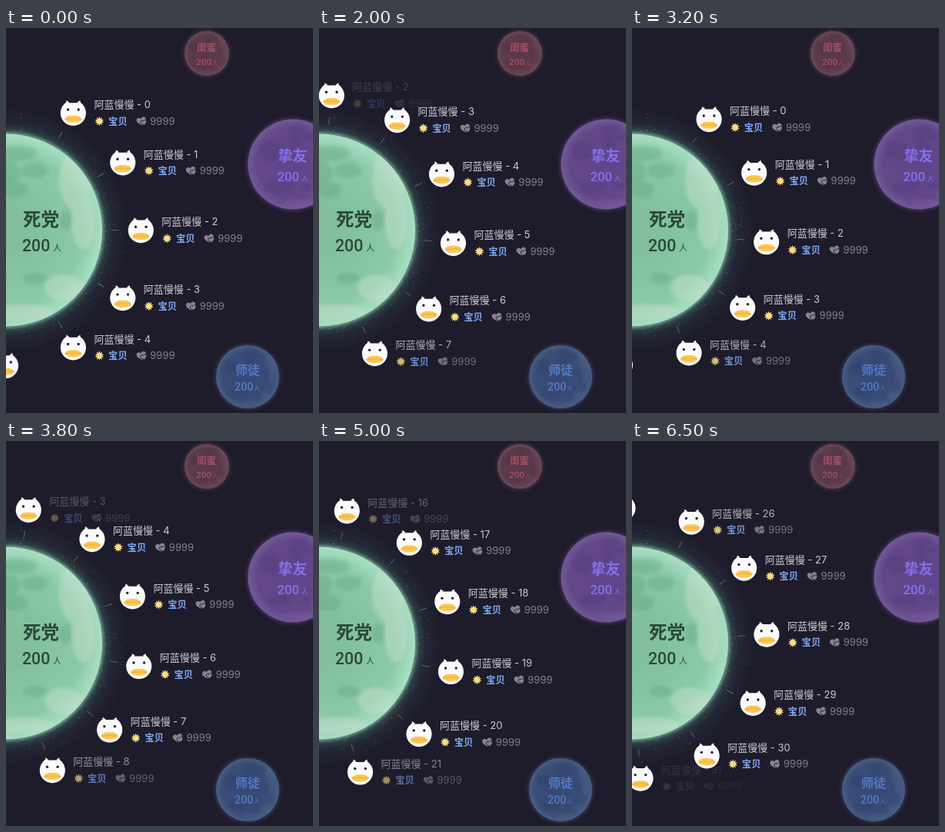
An HTML page that plays this animation: 399x500 px, repeating every 6550 ms.

```html
<!DOCTYPE html>
<html lang="zh-CN">
<head>
<meta charset="utf-8">
<title>Planet list</title>
<style>
  html, body { margin: 0; width: 100%; height: 100%; overflow: hidden; background: #1e1b2b; }
  svg { display: block; width: 399px; height: 500px; }
  text { font-family: Inter, "Noto Sans CJK SC", "Noto Sans CJK", sans-serif; }
  .count { font-family: Roboto, "Noto Sans CJK SC", sans-serif; font-weight: 500; }
  .title { font-weight: 700; }
  .name { font-size: 13px; fill: #cdccd3; }
  .tag { font-size: 12.3px; font-weight: 700; fill: #7fabf3; }
  .score { font-size: 13px; fill: #85838c; }
</style>
</head>
<body>
<svg id="stage" viewBox="0 0 399 500" xmlns="http://www.w3.org/2000/svg">
  <defs>
    <radialGradient id="halo" gradientUnits="userSpaceOnUse" cx="0" cy="262.5" r="160">
      <stop offset=".77" stop-color="#79cfa8" stop-opacity=".6"/>
      <stop offset=".81" stop-color="#5fae95" stop-opacity=".26"/>
      <stop offset=".87" stop-color="#4c8f86" stop-opacity=".1"/>
      <stop offset="1" stop-color="#4c8f86" stop-opacity="0"/>
    </radialGradient>
    <filter id="soft" x="-40%" y="-40%" width="180%" height="180%"><feGaussianBlur stdDeviation="2.2"/></filter>
    <g id="face">
      <path d="M-10-11 -8.8-16.3 -5-13.5ZM10-11 8.8-16.3 5-13.5Z" fill="#fbfafc"/>
      <path d="M-9.5-13.4Q0-12.4 9.5-13.4A16.6 16.6 0 1 1-9.5-13.4Z" fill="#fbfafc"/>
      <circle cx="-6.8" cy="-4.3" r="1.7" fill="#24212c"/>
      <circle cx="6.8" cy="-4.3" r="1.7" fill="#24212c"/>
      <path d="M-11.3 8.3C-9 3.4-4 3.4 0 3.4S9 3.4 11.3 8.3C8.5 14-8.5 14-11.3 8.3Z" fill="#fdc650"/>
      <path d="M-10 8.2Q0 6.6 10 8.2" fill="none" stroke="#eda93a" stroke-width=".9"/>
    </g>
    <path id="heart" d="M0 6C-3 4-7 1-6.5-2.2C-6-5.6-2-6.2 0-3.2C2-6.2 6-5.6 6.5-2.2C7 1 3 4 0 6Z"/>
  </defs>
  <rect width="399" height="500" fill="#1e1b2b"/>
  <circle cy="262.5" r="160" fill="url(#halo)"/>
  <g id="dust" fill="#a9cfc4"></g>
  <g id="moons"></g>
  <g id="items"></g>
</svg>
<script>
const NS = "http://www.w3.org/2000/svg";
const $ = id => document.getElementById(id);

function add(parent, tag, attrs = {}, text = "") {
  const el = document.createElementNS(NS, tag);
  for (const k in attrs) el.setAttribute(k, attrs[k]);
  if (text) el.textContent = text;
  parent.appendChild(el);
  return el;
}

function seeded(seed) {
  return () => (seed = (seed * 16807) % 2147483647) / 2147483647;
}

const CENTER = { x: -0.5, y: 262.5 }, ORBIT = 175.8, STEP = 30, COUNT = 34;

// Specks scattered around the big moon
const rnd = seeded(4177);
for (let i = 0; i < 220; i++) {
  const a = (rnd() - 0.5) * Math.PI, d = rnd() ** 2;
  const r = 127 + d * 38;
  add($("dust"), "circle", {
    cx: (r * Math.cos(a)).toFixed(1), cy: (CENTER.y + r * Math.sin(a)).toFixed(1),
    r: (0.3 + rnd() * 0.35).toFixed(2), opacity: (0.5 - d * 0.35).toFixed(2)
  });
}

const moons = [
  { id: "green", x: 0, y: 262.5, r: 125, tones: ["#80be9c", "#8bcaa8", "#a9dfc3"], spot: "#5b9d7e", light: "#c3dfcc",
    title: "死党", ink: "#2b4838", tx: 22, ty: 257, size: 23.6, cy: 290, num: 21.3, px: 61, unit: 11 },
  { id: "violet", x: 373, y: 177, r: 58.5, tones: ["#61458a", "#634889", "#735897"], spot: "#4c3a74", light: "#795c9b",
    title: "挚友", ink: "#8470ea", tx: 353.5, ty: 172.5, size: 19, cy: 199, num: 16.8, px: 383.5, unit: 9 },
  { id: "rose", x: 261, y: 33, r: 29, tones: ["#5a3849", "#5c3b4c", "#694957"], spot: "#482d3f", light: "#6d4b5a",
    title: "闺蜜", ink: "#a55064", tx: 248, ty: 30, size: 12.5, cy: 48, num: 11.8, px: 268, unit: 7 },
  { id: "blue", x: 314, y: 453, r: 41, tones: ["#374a76", "#3a4d77", "#4a5c81"], spot: "#2d3d64", light: "#4d6087",
    title: "师徒", ink: "#5279c2", tx: 298, ty: 449.5, size: 16, cy: 471, num: 14.3, px: 322, unit: 8 }
];

// Patches in units of the radius: x, y, rx, ry
const dark = [[.12, -.8, .2, .08], [.3, -.62, .14, .08], [.1, -.42, .13, .08], [.02, -.6, .12, .12],
              [-.5, -.3, .25, .2], [.62, -.1, .07, .1], [-.3, .5, .3, .13], [.3, .5, .12, .06]];
const pale = [[.72, -.52, .17, .3], [.8, -.1, .12, .3], [.15, .85, .34, .08], [.6, .6, .2, .14]];

function drawMoon(m) {
  const g = add($("moons"), "g");
  const grad = add(g, "radialGradient", { id: m.id });
  m.tones.forEach((c, i) => add(grad, "stop", { offset: [.2, .8, 1][i], "stop-color": c }));
  add(add(g, "clipPath", { id: m.id + "Clip" }), "circle", { cx: m.x, cy: m.y, r: m.r });
  add(g, "circle", { cx: m.x, cy: m.y, r: m.r + 2, fill: m.tones[2], opacity: .4, filter: "url(#soft)" });
  add(g, "circle", { cx: m.x, cy: m.y, r: m.r, fill: `url(#${m.id})` });

  const skin = add(g, "g", { "clip-path": `url(#${m.id}Clip)` });
  const patch = (list, fill, opacity) => {
    const layer = add(skin, "g", { fill, opacity, filter: "url(#soft)" });
    for (const [x, y, rx, ry] of list)
      add(layer, "ellipse", { cx: m.x + x * m.r, cy: m.y + y * m.r, rx: rx * m.r, ry: ry * m.r });
  };
  patch(dark, m.spot, .32);
  patch(pale, m.light, .5);

  add(g, "text", { x: m.tx, y: m.ty, "font-size": m.size, fill: m.ink, class: "title" }, m.title);
  add(g, "text", { x: m.tx - 1, y: m.cy, "font-size": m.num, fill: m.ink, class: "count" }, "200");
  add(g, "text", { x: m.px, y: m.cy - .5, "font-size": m.unit, fill: m.ink }, "人");
}
moons.forEach(drawMoon);

const star = Array.from({ length: 20 }, (_, i) => {
  const a = i * Math.PI / 10, r = i % 2 ? 3.5 : 6.2;
  return (r * Math.sin(a)).toFixed(2) + "," + (-r * Math.cos(a)).toFixed(2);
}).join(" ");

function makeItem(i) {
  const root = add($("items"), "g");
  const tick = add(root, "line", { x1: 137.5, x2: 147.5, stroke: "#8b8993", "stroke-width": .9, opacity: .65 });
  const body = add(root, "g");
  const label = add(body, "g");
  add(label, "text", { x: 27, y: -6.1, class: "name" }, "阿蓝慢慢 - " + i);
  add(label, "polygon", { points: star, fill: "#f8dc85", transform: "translate(34 10.8)" });
  add(label, "text", { x: 45.7, y: 15.3, class: "tag" }, "宝贝");
  add(label, "use", { href: "#heart", fill: "#85838c", transform: "translate(88.6 10.6) rotate(-12) scale(.95)" });
  add(label, "use", { href: "#heart", fill: "#85838c", stroke: "#1e1b2b", "stroke-width": 1.5,
    transform: "translate(91.6 12.6) rotate(-12) scale(.6)" });
  add(label, "text", { x: 99.9, y: 15.4, class: "score" }, "9999");
  add(body, "use", { href: "#face" });
  return { root, tick, body, label };
}
const items = Array.from({ length: COUNT }, (_, i) => makeItem(i));

// Scroll path: time in ms, angle in degrees, speed in degrees per ms
const LOOP = 6550;
const keys = [[0, 0, 0], [1100, 38.7, 0], [2000, -84.5, 0], [3200, 4.9, 0],
              [4350, -288.6, -.275], [5650, -675.7, -.178], [6550, -786.5, -.05]];

function scrollAt(t) {
  let i = 0;
  while (i < keys.length - 2 && t >= keys[i + 1][0]) i++;
  const [t0, a, va] = keys[i], [t1, b, vb] = keys[i + 1];
  const h = t1 - t0, u = (t - t0) / h, v = 1 - u;
  return v * v * (1 + 2 * u) * a + u * u * (3 - 2 * u) * b + h * u * v * (v * va - u * vb);
}

function draw(now) {
  const t = Math.floor((now % LOOP) / 50) * 50;
  const scroll = scrollAt(t);
  items.forEach((item, i) => {
    const deg = (i - 2) * STEP + scroll, off = Math.abs(deg);
    item.root.style.display = off < 110 ? "" : "none";
    if (off >= 110) return;
    const rad = deg * Math.PI / 180;
    const x = CENTER.x + ORBIT * Math.cos(rad), y = CENTER.y + ORBIT * Math.sin(rad);
    item.body.setAttribute("transform", `translate(${x.toFixed(2)} ${y.toFixed(2)})`);
    item.tick.setAttribute("transform", `translate(${CENTER.x} ${CENTER.y}) rotate(${deg.toFixed(2)})`);
    item.label.setAttribute("opacity", Math.max(0, Math.min(1, (90 - off) / 30)).toFixed(3));
  });
}

let start;
function frame(now) {
  start ??= now;
  draw(Math.max(0, now - start));
  requestAnimationFrame(frame);
}
draw(0);
requestAnimationFrame(frame);
</script>
</body>
</html>
```
